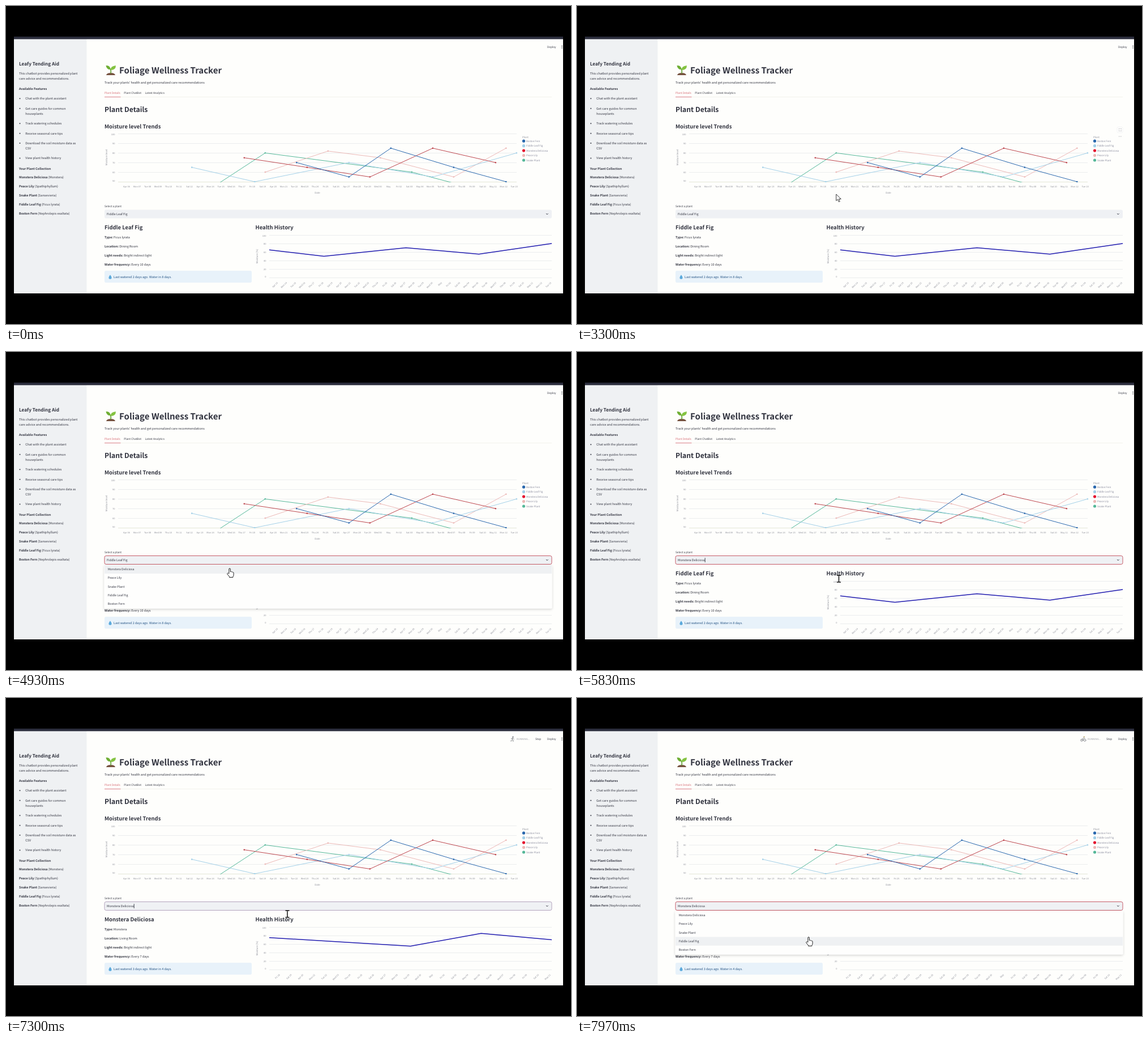
Animation of 998x561 px, one loop 8 s. Source, as an HTML page:

```html
<!DOCTYPE html>
<html lang="en">
<head>
<meta charset="utf-8">
<title>Plant dashboard</title>
<style>
  html, body { margin: 0; width: 100%; height: 100%; overflow: hidden; background: #000; }
  svg { display: block; width: 100vw; height: 100vh; }
  text {
    font-family: "Noto Sans CJK JP", "Noto Sans CJK SC", "Noto Sans CJK", "Noto Sans", sans-serif;
    text-rendering: geometricPrecision;
    white-space: pre;
  }
</style>
</head>
<body>
<svg id="stage" viewBox="0 0 998 561"></svg>
<script>
const LOOP = 8000;
const INK = '#31333f', GREY = '#8b8d97', GRID = '#ebedee';
const BOLD = 700;
const BODY = 6.1, SMALL = 5.3, TICK = 4.5;

// y is the middle of the capitals; the 1.117 fits the font's large Latin letters
function text(x, y, str, size = BODY, o = {}) {
  const { fill = INK, weight = 400, anchor = 'start', turn = 0, id = '' } = o;
  const spin = turn ? ` transform="rotate(${turn} ${x} ${y})"` : '';
  return `<text${id && ` id="${id}"`} x="${x}" y="${y + size * .33}" font-size="${size / 1.117}"` +
    ` font-weight="${weight}" fill="${fill}" text-anchor="${anchor}"${spin}>${str}</text>`;
}
const pair = (x, y, key, value) =>
  text(x, y, `<tspan font-weight="${BOLD}">${key}</tspan> ${value}`);
const rect = (x, y, w, h, fill, more = '') =>
  `<rect x="${x}" y="${y}" width="${w}" height="${h}" fill="${fill}" ${more}/>`;
const line = (x1, y1, x2, y2, stroke, width = 1, more = '') =>
  `<path d="M${x1} ${y1}L${x2} ${y2}" stroke="${stroke}" stroke-width="${width}" ${more}/>`;
const dot = (x, y, r, fill) => `<circle cx="${x}" cy="${y}" r="${r}" fill="${fill}"/>`;
const poly = (pts, stroke, width) =>
  `<polyline points="${pts.join(' ')}" fill="none" stroke="${stroke}" stroke-width="${width}" stroke-linejoin="round"/>`;
const crisp = y => Math.floor(y) + .5;

// Days count from Sunday 6 April; values are moisture readings.
const plants = [
  { name: 'Boston Fern', latin: 'Nephrolepis exaltata', color: '#2a68ae', data: [[16, 70], [21, 55], [25, 85], [31, 65], [36, 50]] },
  { name: 'Fiddle Leaf Fig', latin: 'Ficus lyrata', color: '#a3d0e8', data: [[6, 65], [12, 50], [21, 70], [29, 55], [37, 80]] },
  { name: 'Monstera Deliciosa', latin: 'Monstera', color: '#bd464e', key: '#e5142f', data: [[11, 75], [17, 65], [23, 55], [29, 85], [35, 70]] },
  { name: 'Peace Lily', latin: 'Spathiphyllum', color: '#ecb9b7', data: [[13, 60], [19, 82], [24, 75], [31, 55], [36, 85]] },
  { name: 'Snake Plant', latin: 'Sansevieria', color: '#55b899', data: [[6, 30], [13, 80], [27, 60], [34, 40]] }
];
const [fern, fig, monstera, lily, snake] = plants;
const options = [monstera, lily, snake, fig, fern];

function dayLabel(d) {
  if (d === 25) return 'May';
  const date = d < 25 ? 6 + d : d - 24;
  const week = ['', 'Mon', 'Tue', 'Wed', 'Thu', 'Fri', 'Sat'];
  return `${week[d % 7] || (d < 25 ? 'Apr' : 'May')} ${String(date).padStart(2, '0')}`;
}

function sidebar() {
  let s = rect(14, 58, 128.5, 449, '#eff1f3');
  s += text(23, 102.2, 'Leafy Tending Aid', 9.15, { weight: BOLD });
  s += text(23, 118.7, 'This chatbot provides personalized plant') + text(23, 128.4, 'care advice and recommendations.');
  s += text(23, 146, 'Available Features', BODY, { weight: BOLD });
  const items = [[163, 'Chat with the plant assistant'], [180.5, 'Get care guides for common', 'houseplants'],
    [207, 'Track watering schedules'], [224.5, 'Receive seasonal care tips'],
    [241.7, 'Download the soil moisture data as', 'CSV'], [268.3, 'View plant health history']];
  for (const [y, first, second] of items) {
    s += dot(24.5, y + .3, 1, INK) + text(34.3, y, first);
    if (second) s += text(34.3, y + 9.7, second);
  }
  s += text(23, 286.5, 'Your Plant Collection', BODY, { weight: BOLD });
  options.forEach((p, i) => s += pair(23, 302 + 15.9 * i, p.name, `(${p.latin})`));
  return s;
}

function seedling() {
  return `<path d="M177 122q1-4 8-4t8 4z" fill="#76523f"/>
    <path d="M185 119q1-4-.5-8" fill="none" stroke="#5d9b2c" stroke-width="1.6"/>
    <path d="M185 112q-7 1-8.500-7q7-1 8.500 7z" fill="#6fae34"/>
    <path d="M185 113q-1-7 9-8q0 8-9 8z" fill="#84c341"/>`;
}

function header() {
  let s = seedling();
  s += text(200, 113.5, 'Foliage Wellness Tracker', 16.8, { weight: BOLD });
  s += text(174, 135, "Track your plants' health and get personalized care recommendations");
  s += text(174, 153, 'Plant Details', SMALL, { fill: '#d4606a' });
  s += text(208.3, 153, 'Plant ChatBot', SMALL) + text(245.5, 153, 'Latest Analytics', SMALL);
  s += line(174, 160.5, 964, 160.5, '#f3f3ec') + line(174, 160.5, 202.5, 160.5, '#da8088');
  s += text(174, 182.6, 'Plant Details', 13.65, { weight: BOLD });
  s += text(174, 212.7, 'Moisture level Trends', 10.6, { weight: BOLD });
  s += text(956, 72.3, 'Deploy', SMALL);
  for (const y of [70.2, 72.4, 74.6]) s += dot(982, y, .7, INK);
  return s;
}

function trends() {
  const px = d => 217.3 + 18.5 * d, py = v => 310 - (v - 50) * 1.69;
  let s = '';
  for (let v = 50; v <= 100; v += 10) {
    const y = crisp(py(v));
    s += line(198, y, 902, y, v === 50 ? '#e4e6d8' : GRID);
    s += text(192.5, py(v) + (v === 50 ? -1.5 : v === 100 ? 1.5 : 0), v, TICK, { fill: GREY, anchor: 'end' });
  }
  for (let d = 0; d < 38; d++) s += text(213 + 18.5 * d, 318.5, dayLabel(d), TICK, { fill: GREY, anchor: 'middle' });
  s += text(177, 267, 'Moisture level', 4.9, { fill: GREY, anchor: 'middle', turn: -90 });
  s += text(550, 329.3, 'Date', 4.9, { fill: GREY, anchor: 'middle' });
  s += '<clipPath id="plot"><path d="M198 222H904V311H198z"/></clipPath><g clip-path="url(#plot)">';
  for (const p of [snake, lily, fig, monstera, fern]) {
    const pts = p.data.map(([d, v]) => [px(d), py(v)]);
    s += poly(pts, p.color, 1) + pts.map(([x, y]) => dot(x, y, 1.3, p.color)).join('');
  }
  s += '</g>' + text(912, 231, 'Plant', 4.9, { fill: GREY });
  plants.forEach((p, i) => {
    const y = 238.2 + 8.45 * i;
    s += dot(914.5, y, 2.6, p.key || p.color) + text(919, y, p.name, 4.9, { fill: '#85879a' });
  });
  return s;
}

function details(id, p, room, every, ago) {
  let s = `<g id="${id}">` + text(174, 391, p.name, 10.6, { weight: BOLD });
  s += pair(174, 408, 'Type:', p.latin) + pair(174, 424, 'Location:', room);
  s += pair(174, 440.2, 'Light needs:', 'Bright indirect light') + pair(174, 456.2, 'Water frequency:', `Every ${every} days`);
  s += text(190, 477.7, `Last watered ${ago} days ago. Water in ${every - ago} days.`, BODY, { fill: '#1f4f80' });
  const start = p.data[0][0], end = p.data[p.data.length - 1][0], step = 499 / (end - start);
  const px = d => 465 + (d - start) * step;
  s += poly(p.data.map(([d, v]) => [px(d), 479 - .75 * v]), '#221db0', 1.5);
  for (let d = start + 1; d <= end; d++) {
    s += text(px(d - .23) + 2, 487.5, dayLabel(d), TICK, { fill: GREY, anchor: 'end', turn: -45 });
  }
  return s + '</g>';
}

function detailFrame() {
  let s = text(174, 353, 'Select a plant', SMALL);
  s += rect(174, 359.5, 790, 15, '#eff1f4', 'id="box" rx="2.8" stroke-width="1"');
  s += text(178, 367, '', BODY, { id: 'value' }) + line(0, 363.2, 0, 371, INK, .9, 'id="caret"');
  s += '<path d="M954 366l1.800 1.800l1.800-1.800" fill="none" stroke="#31333f" stroke-width="1"/>';
  s += rect(174, 467, 260, 21, '#e8f2fa', 'rx="2.8"');
  s += '<path d="M184 474.300q-2.600 3.300-2.600 4.900a2.600 2.500 0 0 0 5.200 0q0-1.600-2.600-4.900z" fill="#5aa9dc"/>';
  s += text(440.5, 391, 'Health History', 10.6, { weight: BOLD });
  for (let v = 0; v <= 100; v += 20) {
    const y = 479 - .75 * v;
    s += line(465, crisp(y), 964, crisp(y), GRID);
    s += text(459.5, y + (v === 100 ? 1.5 : v ? .5 : -1), v, TICK, { fill: GREY, anchor: 'end' });
  }
  s += text(443.5, 441.5, 'Moisture (%)', 4.9, { fill: GREY, anchor: 'middle', turn: -90 });
  return s + text(713.5, 508, 'Date', 4.9, { fill: GREY, anchor: 'middle' });
}

function menu() {
  let s = '<g id="menu">' + rect(173.5, 375.6, 791, 77, '#fefefd', 'rx="2.5" filter="url(#shade)"');
  s += rect(174, 375.6, 790, 15.3, '#eff1f3', 'id="hover"');
  options.forEach((p, i) => s += text(179.7, 383.1 + 15.3 * i, p.name, 6));
  return s + '</g>';
}

function overlays() {
  const stroke = 'fill="none" stroke="#85878c" stroke-width=".9" stroke-linecap="round"';
  return `<g id="tools"><rect x="954" y="213.500" width="10" height="10" rx="2" fill="#fefefd" stroke="#f0f1f2" stroke-width=".7"/>
    <path d="M957.300 217.500v-1h1.300M960 216.500h1.300v1M961.300 219.500v1h-1.300M958.600 220.500h-1.300v-1" fill="none" stroke="#a9abb0" stroke-width=".8"/>
    ${[957.3, 959.3, 961.3].map(x => dot(x, 230, .6, '#a5a7ad')).join('')}</g>
    <g id="running">${text(902, 72.3, 'RUNNING...', 4.9, { fill: '#9a9ca3' })}${text(935, 72.3, 'Stop', SMALL)}
    <g id="runner"><circle cx="895.500" cy="68.800" r="1.200" fill="#85878c"/>
    <path d="M895 70.500l-.7 3l2 1.300l-.5 2M894.300 73.500l-1 2.300h-2M895 71l-2.700 1M895 71l2.300 1.500" ${stroke}/></g>
    <g id="cyclist"><circle cx="891.500" cy="74.500" r="1.900" ${stroke}/><circle cx="897" cy="74.500" r="1.900" ${stroke}/>
    <circle cx="895.700" cy="68.500" r="1.100" fill="#b39a55"/>
    <path d="M891.500 74.500l2-3l2-1.500l1.500 2M893.500 71.500l1.500 1.700l-1 1.800" ${stroke}/></g></g>`;
}

// Each pointer has its hot spot at 0,0.
const pointers = `<g id="pointer">
  <path id="arrow" d="M0 0V11.500L2.700 9.200L4.600 13.500L6.500 12.700L4.700 8.500H8.500z" fill="#fff" stroke="#222" stroke-width=".9"/>
  <path id="beam" d="M-3.500-6H-.8L0-5.500L.8-6H3.500M0-5.500V5.500M-3.500 6H-.8L0 5.500L.8 6H3.500" fill="none" stroke="#111" stroke-width="1.500"/>
  <path id="hand" d="M-1.600 9V1q0-1.300 1.200-1.300T.800 1V5.500q1.200-.8 2.100.4q1.300-.6 2 .6q1.700-.3 1.700 1.300V11q0 2-1.200 3.200V15.500H-1V14.200L-4.600 9.800q-.6-1.200.5-1.600t2.500.8z" fill="#fff" stroke="#222" stroke-width="1"/>
</g>`;

const stage = document.getElementById('stage');
stage.innerHTML = `<defs><filter id="shade" x="-5%" y="-20%" width="110%" height="150%">
  <feDropShadow dx="0" dy="1.500" stdDeviation="2" flood-color="#000" flood-opacity=".18"/></filter></defs>` +
  rect(0, 0, 998, 561, '#000') + rect(14, 54, 970, 453, '#fefefc') + sidebar() + rect(14, 54, 970, 4.5, '#2b2d3c') +
  header() + trends() + detailFrame() + details('figPage', fig, 'Dining Room', 10, 2) +
  details('monsteraPage', monstera, 'Living Room', 7, 3) + menu() + overlays() +
  rect(0, 507, 998, 54, '#000') + rect(984, 54, 14, 453, '#000') + pointers;

const el = {};
stage.querySelectorAll('[id]').forEach(n => el[n.id] = n);
const show = (id, on) => el[id].setAttribute('visibility', on ? 'inherit' : 'hidden');
const within = (t, a, b) => t >= a && t < b;
const ramp = (t, a, b) => Math.min(1, Math.max(0, (t - a) / (b - a)));

const ENTER = 1300, OPEN = 4170, PICK = 5300, RUN = 6100, UPDATE = 6530, REOPEN = 7540;
const track = [[ENTER, 600, 440], [1800, 467.5, 321], [3100, 467.5, 321], [3800, 419, 376], [4670, 419, 376],
  [4930, 395.5, 382], [5100, 395, 384], [5700, 395, 384], [5830, 462.5, 400], [6500, 495, 390],
  [6900, 497, 381], [7370, 497, 381], [7500, 436, 369], [7600, 430, 371], [7900, 409.5, 422], [8000, 409.5, 422]];

function pointerAt(t) {
  const i = Math.max(1, track.findIndex(p => p[0] > t));
  const [t0, x0, y0] = track[i - 1], [t1, x1, y1] = track[i];
  const k = ramp(t, t0, t1), e = k * k * (3 - 2 * k);
  return [x0 + (x1 - x0) * e, y0 + (y1 - y0) * e];
}

function render(t) {
  const [x, y] = pointerAt(t);
  const open = within(t, OPEN, PICK) || t >= REOPEN;
  const picked = t >= PICK + 60;

  const kind = t < 3550 ? 'arrow' : open && y > 376.5 ? 'hand' : 'beam';
  for (const k of ['arrow', 'beam', 'hand']) show(k, k === kind && t >= ENTER);
  el.pointer.setAttribute('transform', `translate(${x} ${y})`);

  const fade = Math.max(ramp(t, OPEN, OPEN + 80) - ramp(t, PICK, PICK + 130), ramp(t, REOPEN, REOPEN + 80));
  el.menu.setAttribute('opacity', fade);
  let row = t >= PICK ? 0 : 3;
  if (kind === 'hand') row = Math.floor((y - 375.6) / 15.3);
  el.hover.setAttribute('y', 375.6 + 15.3 * row);

  const value = picked ? monstera.name : fig.name;
  if (el.value.textContent !== value) el.value.textContent = value;
  const blink = within(t, OPEN, 4700) || within(t, PICK + 60, 6000) || within(t, 6500, 7000) || within(t, 7200, 7700);
  el.caret.setAttribute('transform', `translate(${178.4 + el.value.getComputedTextLength()} 0)`);
  show('caret', blink);
  el.box.setAttribute('stroke', t < OPEN ? 'none' : within(t, UPDATE, REOPEN) ? '#b3a3bd' : '#c65c68');

  show('figPage', t < UPDATE);
  show('monsteraPage', t >= UPDATE);
  show('tools', within(t, 1600, 3500));
  show('running', t >= RUN);
  const cycling = t >= 7400;
  show('cyclist', cycling);
  show('runner', !cycling);
}

const begin = performance.now();
function tick() {
  render((performance.now() - begin) % LOOP);
  requestAnimationFrame(tick);
}
tick();
</script>
</body>
</html>
```
